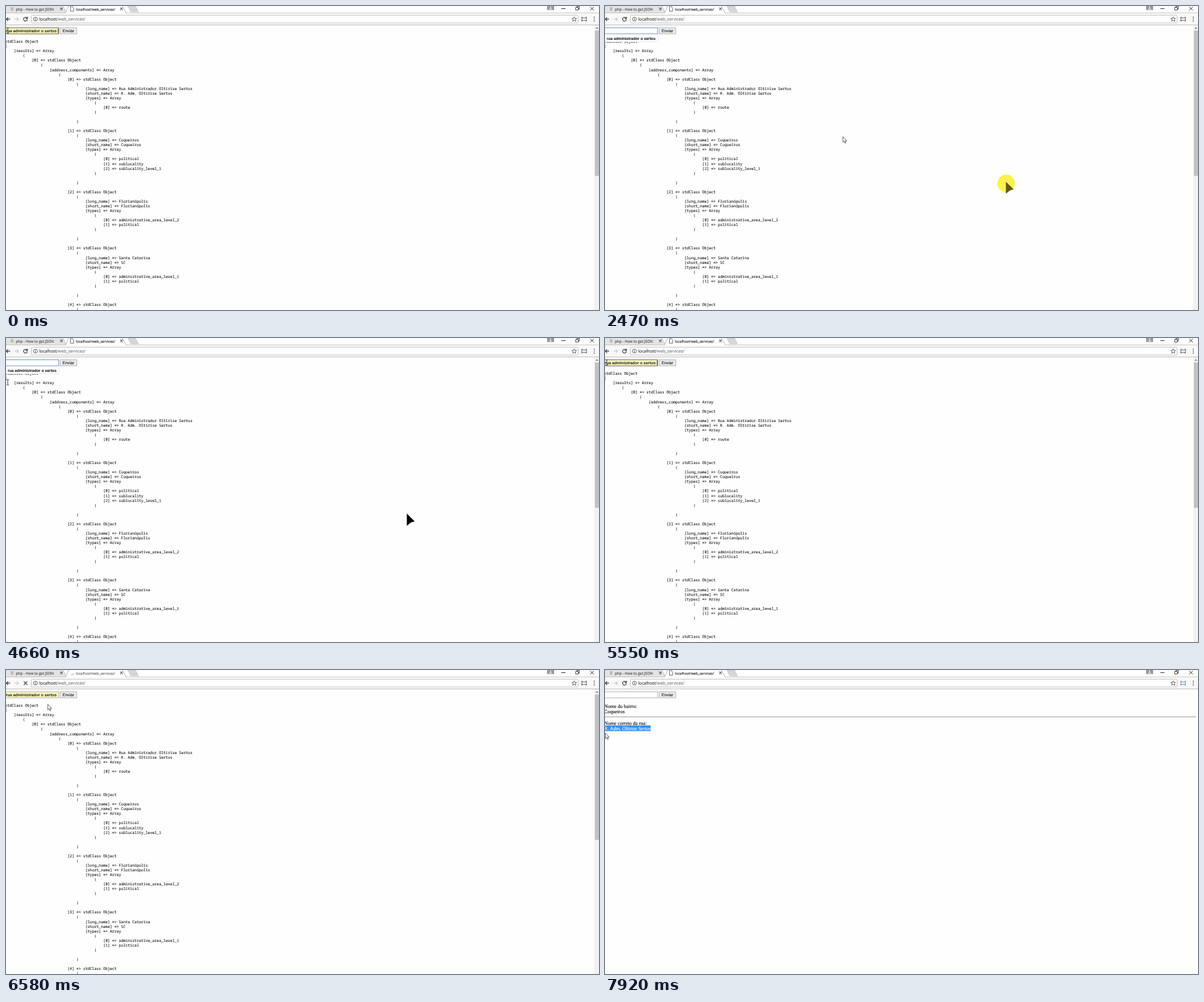
Write an HTML page that moves like this. It is 1017 px wide and 521 px high and loops after 7.99 s.

```html
<!DOCTYPE html>
<html lang="pt">
<head>
<meta charset="utf-8">
<title>web_services</title>
<style>
  html, body { margin: 0; width: 100%; height: 100%; overflow: hidden; background: #fefefe; }
  svg { display: block; width: 1017px; height: 521px; }
  text { white-space: pre; text-rendering: geometricPrecision; stroke: currentColor; stroke-width: .15px; }
  .ui { font-family: "Open Sans", sans-serif; fill: currentColor; color: #333; }
  .form { font-family: "Liberation Sans", Arial, sans-serif; fill: currentColor; color: #222; }
  .mono { font: 6.38px "Noto Sans Mono", monospace; fill: currentColor; color: #262626; }
  .serif { font: 8.5px "Liberation Serif", serif; fill: currentColor; color: #111; }
  .line { fill: none; stroke: #444; stroke-width: 1.3; }
</style>
</head>
<body>
<svg viewBox="0 0 1017 521">
  <defs>
    <clipPath id="selClip"><rect id="selClipBox" y="94" height="12"/></clipPath>
  </defs>
  <rect width="1017" height="521" fill="#fefefe"/>

  <!-- tab strip -->
  <path d="M-2 12V-1H97L103 12Z" fill="#e3e3e3"/>
  <path d="M0 12H102L108 -1M199 -1L206 12H1017" fill="none" stroke="#b0b0b0"/>
  <path d="M97 -1L103 11" stroke="#b0b0b0" stroke-width=".8"/>
  <path d="M209 0H222L227 10H214Z" fill="#d6d6d6" stroke="#bbb" stroke-width=".7"/>
  <rect x="8" y="2" width="5" height="6" fill="#c4bdb3"/>
  <text class="ui" x="17" y="7.5" font-size="6.3" style="color:#444">php - How to get JSON</text>
  <path d="M93 3l4 4m0 -4l-4 4M196 3l4 4m0 -4l-4 4" stroke="#444" stroke-width="1.1"/>
  <path id="pageIcon" d="M110.5 1H114L116 3.5V9H110.5Z" fill="#fff" stroke="#555" stroke-width=".9"/>
  <path id="spinner" d="M112 2A3 3 0 0 1 116 5" fill="none" stroke="#aaa"/>
  <text id="tabTitle" class="ui" x="120" y="7.5" font-size="6.07">localhost/web_services/</text>
  <rect x="928" y="-1" width="12" height="8" fill="#999"/>
  <path d="M931 6q3 -4 6 0M933 1h2v2h-2z" fill="#eee"/>
  <path d="M952.5 4.5h7" stroke="#222"/>
  <path d="M977 2.5h4.5v4.5h-4.5zM979 2V.7h4.3v4.5h-1.5" fill="none" stroke="#222" stroke-width=".9"/>
  <path d="M1002 1.5l6 6m0 -6l-6 6" stroke="#222"/>

  <!-- toolbar -->
  <rect y="12.5" width="1017" height="20" fill="#f8f8f8"/>
  <path d="M0 32.5H1017" stroke="#bcbcbc"/>
  <rect x="43.5" y="16" width="937.5" height="13" rx="1.5" fill="#fff" stroke="#b8b8b8" stroke-width=".9"/>
  <path class="line" d="M7 22.5H0.5M3.5 19.5L.5 22.5L3.5 25.5"/>
  <path class="line" d="M15 22.5H21M18.5 19.5L21.5 22.5L18.5 25.5" style="stroke:#ccc"/>
  <path id="reload" class="line" d="M36 20.5A3.3 3.3 0 1 0 36.7 23.2M36.7 18.5V21.5H33.7"/>
  <path id="stop" class="line" d="M30.5 19.5l6 6m0 -6l-6 6"/>
  <circle cx="50.5" cy="22.5" r="3.3" class="line" style="stroke-width:.9"/>
  <path d="M50.5 22v2.5M50.5 20.2v1" stroke="#444"/>
  <text class="ui" x="57" y="25" font-size="7.16">localhost<tspan style="color:#777" fill="#777" stroke="#777">/web_services/</tspan></text>
  <path d="M974.5 18.5l1.1 2.6 2.9 .3-2.2 1.9.7 2.8-2.5-1.5-2.5 1.5.7-2.8-2.2-1.9 2.9-.3z" fill="none" stroke="#444" stroke-width=".9"/>
  <path id="frameIcon" d="M989 19h-1.5v7h1.5M994 19h1.5v7h-1.5M988 20.5h7M988 24.5h7" fill="none" stroke-width=".9"/>
  <path d="M1008 18.5h1.6v1.6h-1.6zm0 3.2h1.6v1.6h-1.6zm0 3.2h1.6v1.6h-1.6z" fill="#444"/>

  <!-- pages -->
  <g id="jsonPage">
    <g id="dump" class="mono"></g>
    <rect x="1009" y="33" width="8" height="488" fill="#f1f1f1"/>
    <rect x="1010" y="42" width="7" height="249" fill="#c1c1c1"/>
    <path d="M1011 39l2.5 -3 2.5 3z" fill="#888"/>
  </g>
  <g id="resultPage" class="serif">
    <text x="-1.2" y="64.5">Nome do bairro:</text>
    <text x="-1.2" y="74">Coqueiros</text>
    <path d="M0 80.3H1014" stroke="#a8a8a8" stroke-width="1.3"/>
    <text x="-1.2" y="93.5">Nome correto da rua:</text>
    <text id="street" x="-1.2" y="103">R. Adm. Oltirise Sertos</text>
    <g clip-path="url(#selClip)">
      <rect x="-2" y="95" width="120" height="9.7" fill="#3390f5"/>
      <text x="-1.2" y="103" style="color:#fff" fill="#fff">R. Adm. Oltirise Sertos</text>
    </g>
  </g>

  <!-- form -->
  <rect id="field" x="-2" y="37.3" width="92.3" height="10.5"/>
  <text id="fieldText" class="form" x="-.5" y="44.8" font-size="6.9" font-weight="bold" style="color:#3a3a2c">rua administrador o sertos</text>
  <path id="caret" d="M89.3 38.5V46.5" stroke="#222" stroke-width=".8"/>
  <rect x="93" y="37.3" width="28.3" height="10.5" fill="#ececec" stroke="#a6a6a6" stroke-width=".9"/>
  <text class="form" x="107" y="45" font-size="7.1" text-anchor="middle">Enviar</text>
  <g id="drop">
    <rect x="-2" y="48.5" width="93" height="13" fill="#fff" stroke="#ddd" stroke-width=".7"/>
    <text class="form" x="3" y="57.5" font-size="6.6" font-weight="bold">rua administrador o sertos</text>
  </g>

  <!-- pointers -->
  <path id="arrow" d="M0 0V9.5L2.2 7.5L3.7 11L5.3 10.3L3.8 7H6.7Z" fill="#fff" stroke="#444" stroke-width=".9"/>
  <path id="beam" d="M-2 -4.5H-.5L0 -4L.5 -4.5H2M0 -4V4M-2 4.5H-.5L0 4L.5 4.5H2" fill="none" stroke="#333" stroke-width="1"/>
  <circle id="glow" cx="688" cy="304" r="15" fill="#fcf04c"/>
  <path id="bigArrow" d="M0 0L14.5 14.5L7.5 16.5L0 22.5Z" stroke="#fff" stroke-width=".8"/>
</svg>
<script>
const LOOP = 7990;
const $ = id => document.getElementById(id);
const show = (id, on) => $(id).setAttribute('display', on ? 'inline' : 'none');
const set = (id, attrs) => { for (const k in attrs) $(id).setAttribute(k, attrs[k]); };

// print_r listing: [long name, short name, types]
const parts = [
  ['Rua Administrador Oltirise Sertos', 'R. Adm. Oltirise Sertos', ['route']],
  ['Coqueiros', 'Coqueiros', ['political', 'sublocality', 'sublocality_level_1']],
  ['Florianópolis', 'Florianópolis', ['administrative_area_level_2', 'political']],
  ['Santa Catarina', 'SC', ['administrative_area_level_1', 'political']]
];
const rows = [];
const row = (indent, s) => rows.push([indent, s]);
row(0, 'stdClass Object'); row(0, '(');
row(4, '[results] => Array'); row(8, '(');
row(12, '[0] => stdClass Object'); row(16, '(');
row(20, '[address_components] => Array'); row(24, '(');
parts.forEach(([long, short, types], i) => {
  row(28, `[${i}] => stdClass Object`); row(32, '(');
  row(36, '[long_name] => ' + long);
  row(36, '[short_name] => ' + short);
  row(36, '[types] => Array'); row(40, '(');
  types.forEach((type, n) => row(44, `[${n}] => ${type}`));
  row(40, ')'); row(0, ''); row(32, ')'); row(0, '');
});
row(28, '[4] => stdClass Object'); row(32, '(');

rows.forEach(([indent, s], i) => {
  if (!s) return;
  const el = document.createElementNS('http://www.w3.org/2000/svg', 'text');
  el.setAttribute('x', -1.7 + indent * 3.83);
  el.setAttribute('y', 63.2 + i * 8.05);
  el.textContent = s;
  $('dump').append(el);
});

// pointer path: time, x, y, text beam from here on
const pointer = [
  [0, 3, 42, 1], [1719.9, 3, 42, 1], [1720, 408, 224, 0], [2930, 408, 224, 0],
  [3480, 385, 352, 0], [3620, 385, 352, 0], [4050, 200, 250, 1], [4370, 12, 85, 1],
  [4520, 12, 85, 1], [4660, 3, 76, 1], [4800, 4, 56, 0], [4950, 4, 56, 0],
  [5100, 3, 42, 1], [5600, 3, 42, 1], [5800, 92, 44, 0], [6000, 97, 41, 0],
  [6300, 97, 41, 0], [6600, 70, 60, 0], [6930, 28, 67, 1], [7150, 28, 67, 1],
  [7380, 78, 100, 1], [7700, .5, 101, 1], [7770, .5, 108, 0], [LOOP, .5, 108, 0]
];
const bigPointer = [
  [0, 796, 469], [110, 796, 469], [310, 626, 371], [500, 626, 371], [710, 711, 522],
  [2199, 711, 522], [2200, 737, 517], [2270, 684, 448], [2340, 686, 330],
  [2400, 687, 300], [LOOP, 687, 300]
];

function along(keys, t) {
  let i = 0;
  while (i < keys.length - 2 && t >= keys[i + 1][0]) i++;
  const [a, b] = [keys[i], keys[i + 1]];
  const p = (t - a[0]) / (b[0] - a[0]);
  return { x: a[1] + (b[1] - a[1]) * p, y: a[2] + (b[2] - a[2]) * p, beam: a[3] };
}
const within = (t, from, to) => t >= from && t < to;
const move = p => ({ transform: `translate(${p.x.toFixed(2)} ${p.y.toFixed(2)})` });

function draw(t) {
  const picked = within(t, 4900, 6600);
  const filled = t < 1720 || picked;
  const focused = t < 5950;
  const loading = within(t, 6170, 6600);
  const done = t >= 6600;

  show('jsonPage', !done);
  show('resultPage', done);
  show('drop', within(t, 1720, 4900));
  show('fieldText', filled);
  show('caret', filled && focused);
  set('field', {
    fill: filled ? '#faf7c0' : '#fff',
    stroke: !focused ? '#a5a5a5' : filled ? '#77776a' : '#7d9bd0',
    'stroke-width': focused ? 1.2 : .9
  });

  show('pageIcon', !loading);
  show('spinner', loading);
  show('reload', !loading);
  show('stop', loading);
  set('spinner', { transform: `rotate(${(t - 6240) * .36} 113 5)` });
  $('tabTitle').style.color = loading ? '#666' : '#222';
  set('frameIcon', { stroke: t >= 7700 ? '#5c86b5' : '#555' });

  const p = along(pointer, t);
  show('beam', p.beam);
  show('arrow', !p.beam);
  set(p.beam ? 'beam' : 'arrow', move(p));

  const end = done ? $('street').getComputedTextLength() - 1.2 : 0;
  const from = t < 7380 ? end : Math.min(end, p.x < 1 ? -2 : p.x);
  set('selClipBox', { x: from, width: Math.max(0, end - from) });

  const clicked = within(t, 2400, 2600);
  show('bigArrow', within(t, 110, 710) || within(t, 2200, 4900));
  set('bigArrow', { ...move(along(bigPointer, t)), fill: clicked ? '#5f5b0c' : '#050505' });
  show('glow', clicked);
}

const start = performance.now();
function tick() {
  draw((performance.now() - start) % LOOP);
  requestAnimationFrame(tick);
}
tick();
</script>
</body>
</html>
```
